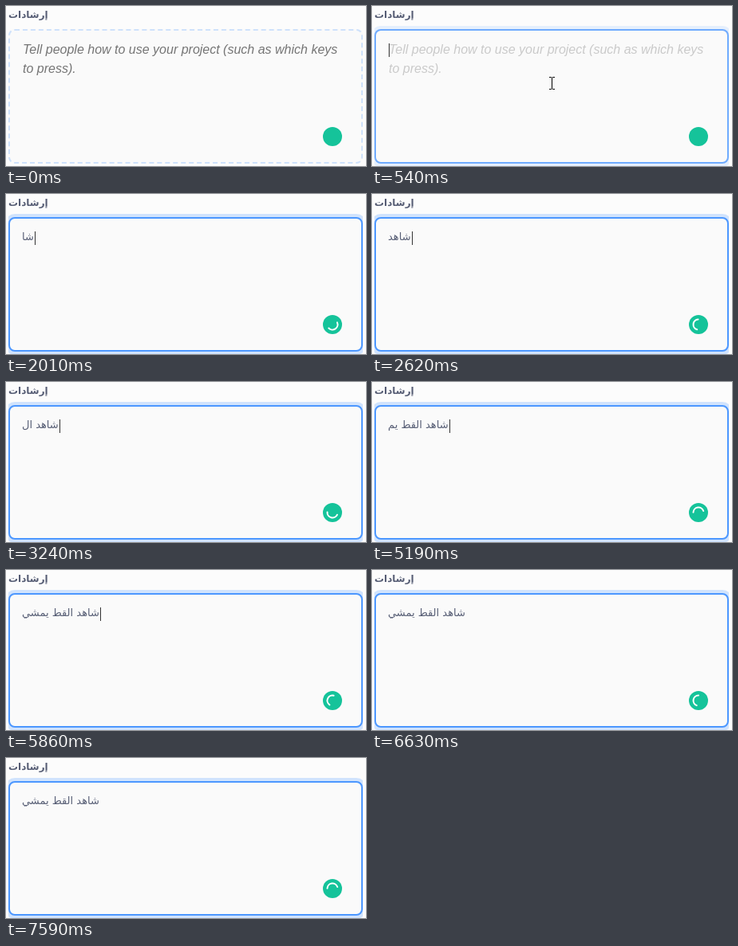
Write an HTML page that moves like this. It is 451 px wide and 201 px high and loops after 7650 ms.

```html
<!DOCTYPE html>
<html lang="ar">
<meta charset="utf-8">
<style>
html, body { margin: 0; width: 100%; height: 100%; overflow: hidden; background: #fcfcfc; }
body > * { position: absolute; }
#label { left: 3px; top: 1px; font: bold 12px/20px "DejaVu Sans", sans-serif; color: #575e75; white-space: pre; }
#clip { inset: 0; clip-path: inset(25px calc(100% - 447px) 0 3px); }
#box { position: absolute; left: 3px; top: 29px; width: 444px; height: 169px; box-sizing: border-box;
  border: 2px dashed; border-radius: 8px; background: #fafafa; }
#hint { left: 21px; top: 43px; font: italic 16px/24px "Liberation Sans", Arial, sans-serif; color: #757575; white-space: pre; }
#line { left: 20px; top: 46px; height: 18px; display: flex; font: 13px/16px "DejaVu Sans", sans-serif; color: #575e75; }
#typed { white-space: pre; }
#caret { width: 1px; height: 17px; margin: 1px 0 0 1px; background: #333; }
svg { left: 0; top: 0; }
</style>
<div id="label" dir="rtl">إرشادات</div>
<div id="clip"><div id="box"></div></div>
<div id="hint">Tell people how to use your project (such as which keys
to press).</div>
<div id="line" dir="ltr"><span id="typed"></span><i id="caret"></i></div>
<svg width="451" height="201" fill="none">
  <circle cx="409" cy="164" r="12" fill="#15c39a"/>
  <path id="arc" d="M402.6 162.9A6.5 6.5 0 0 1 415.4 162.9" stroke="#fff" stroke-width="2" stroke-linecap="round"/>
  <path id="mouse" d="M-3 -7.5H0M1 -7.5H4M.5 -7V7M-3 7.5H0M1 7.5H4" stroke="#000"/>
</svg>
<script>
const $ = id => document.getElementById(id);
const LOOP = 7650, FOCUS = 430, BLINK = 530, SPIN = 1880;
const text = "شاهد القط يمشي";
const keys = [1620, 1880, 2150, 2420, 2690, 2900, 3170, 3580, 3860, 4290, 4640, 5060, 5400, 5720];
const mousePath = [[70, 361, 172], [140, 293, 134], [210, 225, 97]];
const clamp = x => Math.min(1, Math.max(0, x));
const smooth = x => x * x * (3 - 2 * x);
const show = (el, on) => el.style.visibility = on ? "visible" : "hidden";

function draw(t) {
  const focused = t >= 410, p = smooth(clamp((t - 390) / 290));
  const box = $("box").style;
  box.borderStyle = focused ? "solid" : "dashed";
  box.borderColor = `rgba(76,151,255,${focused ? 0.25 + 0.75 * Math.sqrt(p) : 0.25})`;
  box.boxShadow = `0 0 0 4px rgba(76,151,255,${0.25 * p})`;
  $("hint").style.opacity = 1 - Math.pow(p, 0.7);

  const count = keys.filter(k => k <= t).length;
  const lastEdit = count ? keys[count - 1] : FOCUS;
  $("typed").textContent = text.slice(0, count);
  show($("caret"), t >= FOCUS && Math.floor((t - lastEdit) / BLINK) % 2 === 0);

  const at = mousePath.filter(m => m[0] <= t).pop();
  show($("mouse"), at && t < 680);
  if (at) $("mouse").setAttribute("transform", `translate(${at[1]} ${at[2]})`);

  // the spinner starts slowly, then turns once every 800 ms
  const lag = 185 * (1 - clamp((t - SPIN) / 600));
  const angle = (t - 5190) / 800 * 360 - 8 + lag;
  show($("arc"), t >= SPIN);
  $("arc").setAttribute("transform", `rotate(${angle} 409 164)`);
}

function tick() {
  draw(performance.now() % LOOP);
  requestAnimationFrame(tick);
}
tick();
</script>
</html>
```
